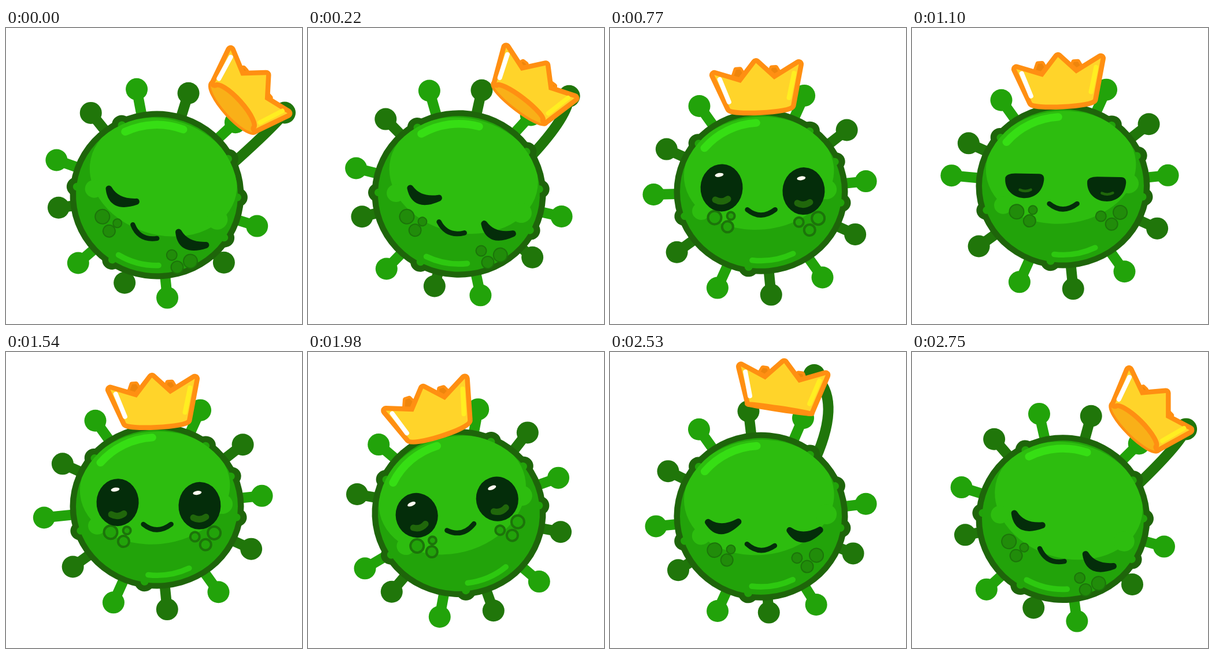
Write an HTML page with a canvas that moves like this. It is 512x512 px and loops after 2860 ms.

```html
<!DOCTYPE html>
<html lang="en">
<head>
<meta charset="utf-8">
<title>Crowned virus</title>
<style>
  html, body { margin: 0; width: 100%; height: 100%; overflow: hidden; background: #fff; }
  canvas { display: block; width: 100vmin; height: 100vmin; }
</style>
</head>
<body>
<canvas id="stage" width="512" height="512"></canvas>
<script>
const ctx = document.getElementById('stage').getContext('2d');
const STEP = 110, STEPS = 26, CX = 261, TAU = Math.PI * 2, RAD = Math.PI / 180;

const C = {
  rim: '#1e650a', body: '#2dbd0f', shade: '#22a30a', light: '#22a30a', dark: '#20760a',
  shine: '#36de14', glow: '#2dc810', ink: '#042d0a', iris: '#20670b',
  spot: '#218c0a', ring: '#1c740a',
  gold: '#ffd42a', amber: '#f9b018', orange: '#ff8f12', rust: '#ee850c', lemon: '#ffee21'
};

// Key poses; crown x and y are relative to the body centre.
const POSES = {
  rest: { y: 267, squash: .947, roll: -5.7, lean: 0, faceX: 3, faceY: -4, crownX: -.5, crownY: -144, crownTurn: -3, bulge: 6.5 },
  left: { y: 279, squash: .967, roll: -20, lean: 0, faceX: -3.5, faceY: -10.5, crownX: -35.5, crownY: -141, crownTurn: -18, bulge: 8 },
  grab: { y: 281, squash: .968, roll: -22, lean: .45, faceX: 0, faceY: .5, crownX: -35.5, crownY: -145, crownTurn: -18, bulge: 8 },
  bow: { y: 289, squash: .966, roll: 19.2, lean: 1, faceX: 2, faceY: 36, crownX: 133, crownY: -152, crownTurn: 48, bulge: -16 }
};

const mix = (a, b, k) => a + (b - a) * k;
const unit = (t, a, b) => Math.max(0, Math.min(1, (t - a) / (b - a)));
const ramp = (t, a, b) => { const x = unit(t, a, b); return x * x * (3 - 2 * x); };
const bump = (t, a, b) => Math.sin(Math.PI * unit(t, a, b));
const blend = (a, b, k) =>
  Object.fromEntries(Object.keys(a).map(name => [name, mix(a[name], b[name], k)]));

function poseAt(t) {
  const falling = t < 13;
  const bow = falling ? 1 - ramp(t, 0, 6.8) : ramp(t, 21, 25.6);
  let p = blend(POSES.rest, POSES.left, ramp(t, 14, 18.5));
  p = blend(p, POSES.grab, ramp(t, 18, 21));
  p = blend(p, POSES.bow, bow);

  const arc = bow * (1 - bow);
  p.faceX += 20 * arc;
  if (falling) p.y += (1 - bow) * 12 * (1 - ramp(t, 7, 13));
  p.y += 6 * bump(t, 4, 8) - 6 * bump(t, 11, 14);
  p.crownX += CX;
  p.crownY += p.y - arc * (falling ? 40 : 160);
  p.open = ramp(t, 2, 4) - .5 * bump(t, 8, 12) - ramp(t, 17.5, 21);
  p.wave = 11 * Math.sin(TAU * unit(t, 6, 22));
  p.stretch = 14 * bump(t, 6, 20);

  // The hand rests like any spike, or grips the crown's right side.
  const hold = falling ? 1 - ramp(t, 4, 7) : ramp(t, 18, 21);
  const rest = (p.roll - 30) * RAD, turn = p.crownTurn * RAD;
  const gx = mix(40, 66, bow), gy = mix(-71, -59, bow);
  p.handX = mix(CX + 183 * Math.cos(rest), p.crownX + gx * Math.cos(turn) - gy * Math.sin(turn), hold);
  p.handY = mix(p.y + 183 * Math.sin(rest), p.crownY + gx * Math.sin(turn) + gy * Math.cos(turn), hold);
  p.hold = hold;
  return p;
}

function group(x, y, turn, draw) {
  ctx.save();
  ctx.translate(x, y);
  ctx.rotate(turn * RAD);
  draw();
  ctx.restore();
}

function oval(x, y, rx, ry, fill, turn = 0) {
  ctx.beginPath();
  ctx.ellipse(x, y, rx, ry, turn * RAD, 0, TAU);
  ctx.fillStyle = fill;
  ctx.fill();
}

function paint(d, fill, stroke, width) {
  const path = new Path2D(d);
  if (stroke) {
    ctx.strokeStyle = stroke;
    ctx.lineWidth = width;
    ctx.stroke(path);
  }
  if (fill) {
    ctx.fillStyle = fill;
    ctx.fill(path);
  }
}

function arc(r, from, to, color, width) {
  const path = new Path2D();
  path.arc(0, 0, r, from * RAD, to * RAD);
  paint(path, null, color, width);
}

// Spikes sit every 30 degrees; leaning forward shifts each a little.
const skew = [-2, -4, 5, 1, 0, 3.5, 0, 2, 0, -2, -2];

function drawSpikes(p) {
  skew.forEach((s, k) => {
    const waving = k === 6, dark = k % 2;
    const a = (30 * k + p.roll + s * p.lean + (waving ? p.wave : 0)) * RAD;
    const sin = Math.sin(a), cos = Math.cos(a);
    const len = (dark ? 179 - p.lean * (6 + 12 * sin) : 182.5 - 4 * p.lean * sin)
      + (waving ? p.stretch : 0);
    const x = CX + len * cos, y = p.y + len * sin;
    const color = dark ? C.dark : C.light;
    paint(`M${CX + 130 * cos},${p.y + 130 * sin}L${x},${y}`, null, color, 18);
    oval(x, y, 19, 19, color);
  });
}

function drawArm(p) {
  const a = (p.roll - 30 - 12 * p.hold) * RAD, bend = a - 19 * RAD;
  const x = CX + 140 * Math.cos(a), y = p.y + 136 * Math.sin(a);
  const pull = .78 * p.hold * Math.hypot(p.handX - x, p.handY - y);
  paint(`M${x},${y}Q${x + pull * Math.cos(bend)},${y + pull * Math.sin(bend)} ${p.handX},${p.handY}`,
    null, C.dark, 18);
  oval(p.handX, p.handY, 19, 19, C.dark);
}

function drawBumps(dist, r, color) {
  for (const a of [-135, -47, -17.5, 14, 104.5, 167])
    oval(dist * Math.cos(a * RAD), dist * Math.sin(a * RAD), r, r, color);
}

function drawBody(p) {
  ctx.save();
  ctx.translate(CX, p.y);
  ctx.scale(1, p.squash);
  ctx.rotate(p.roll * RAD);
  drawBumps(140, 17, C.rim);
  oval(0, 0, 150.5, 150.5, C.rim);
  drawBumps(139, 7, C.shade);
  oval(0, 0, 140, 140, C.shade);

  ctx.save();
  ctx.beginPath();
  ctx.arc(0, 0, 140, 0, TAU);
  ctx.clip();
  oval(0, -34, 130, 103, C.body);
  oval(-106, 25, 16, 16, C.body);
  oval(113, 7, 18, 18, C.body);
  ctx.restore();

  arc(126, 225, 272, C.shine, 14);
  arc(126, 69.5, 102.5, C.glow, 10);
  ctx.restore();
}

const halfEye = 'M-32,-6Q-30,-13 -15,-14L26,-15Q36,-15 35,-4C33,18 18,28 1,28C-18,28 -33,14 -32,-6Z';
const shutEye = 'M-26,5Q-3,34 26,-1Q-2,18 -26,5Z';

function drawEye(open) {
  if (open < .25) {
    paint(shutEye, C.ink, C.ink, 11);
  } else if (open < .7) {
    paint(halfEye, C.ink);
    paint('M-6,14Q4,18 13,13', null, C.iris, 4.5);
  } else {
    oval(0, 0, 36.5, 41 * open, C.ink);
    oval(-5, -22 * open, 7.5, 3.4, '#fffdf0', -11);
    group(1, 22 * open, -6, () => paint('M-11,-2Q0,5 11,-2', null, C.iris, 11));
  }
}

// Cheek spots: x, y, radius
const spots = [[-81, 52, 13.5], [-58, 67, 11.5], [-53, 48, 8.5], [98, 46, 13], [84, 67, 11.5], [65, 54, 10]];

function drawFace(p) {
  group(CX + p.faceX, p.y + p.faceY, p.roll + 8 + 4.7 * p.lean, () => {
    const awake = p.open > .7, far = p.lean ** 3;
    for (const [x, y, r] of spots) {
      const shift = x > 0 ? 9 * far : 0;
      oval(x - shift, y - shift, r, r, C.ring);
      oval(x - shift, y - shift, r - (awake ? 4 : 2), r - (awake ? 4 : 2), awake ? C.shade : C.spot);
    }
    for (const x of [-71, 71]) group(x, 0, 0, () => drawEye(p.open));
    group(-4 * far, 0, 0, () => paint('M-25,36Q-1,54 23,34', null, C.ink, 8.5));
  });
}

function drawCrown(p) {
  group(p.crownX, p.crownY, p.crownTurn, () => {
    const b = p.bulge, depth = Math.abs(b);
    for (const x of [-35, 27]) {
      const y = -66 - .5 * b;
      paint(`M${x - 10},${y + 15}L${x - 4},${y}h7L${x + 11},${y + 15}Z`, C.rust, C.orange, 9);
    }
    if (b < 0) {
      const under = new Path2D();
      under.ellipse(0, 0, 56.5, depth, 0, 0, TAU);
      paint(under, null, C.orange, 9);
      paint(under, C.amber);
    }
    const front = new Path2D(`M-53,-3.5L-77,-62L-32,-46L-4,-79L26,-49L70,${-70 - .5 * b}L53,-3.5`);
    front.ellipse(0, -3.5, 53, depth, 0, 0, Math.PI, b < 0);
    front.closePath();
    paint(front, C.gold, C.orange, 17);
    paint('M-68,-54L-54,-14', null, '#fff', 8);
    paint('M61,-58L50,-16', null, C.lemon, 8);
  });
}

function render(step) {
  const p = poseAt(step);
  ctx.fillStyle = '#fff';
  ctx.fillRect(0, 0, 512, 512);
  ctx.lineCap = ctx.lineJoin = 'round';
  drawArm(p);
  drawSpikes(p);
  drawBody(p);
  drawFace(p);
  drawCrown(p);
}

const start = performance.now();
function tick() {
  const elapsed = Math.max(0, performance.now() - start);
  render(Math.floor(elapsed / STEP) % STEPS);
  requestAnimationFrame(tick);
}
tick();
</script>
</body>
</html>
```
